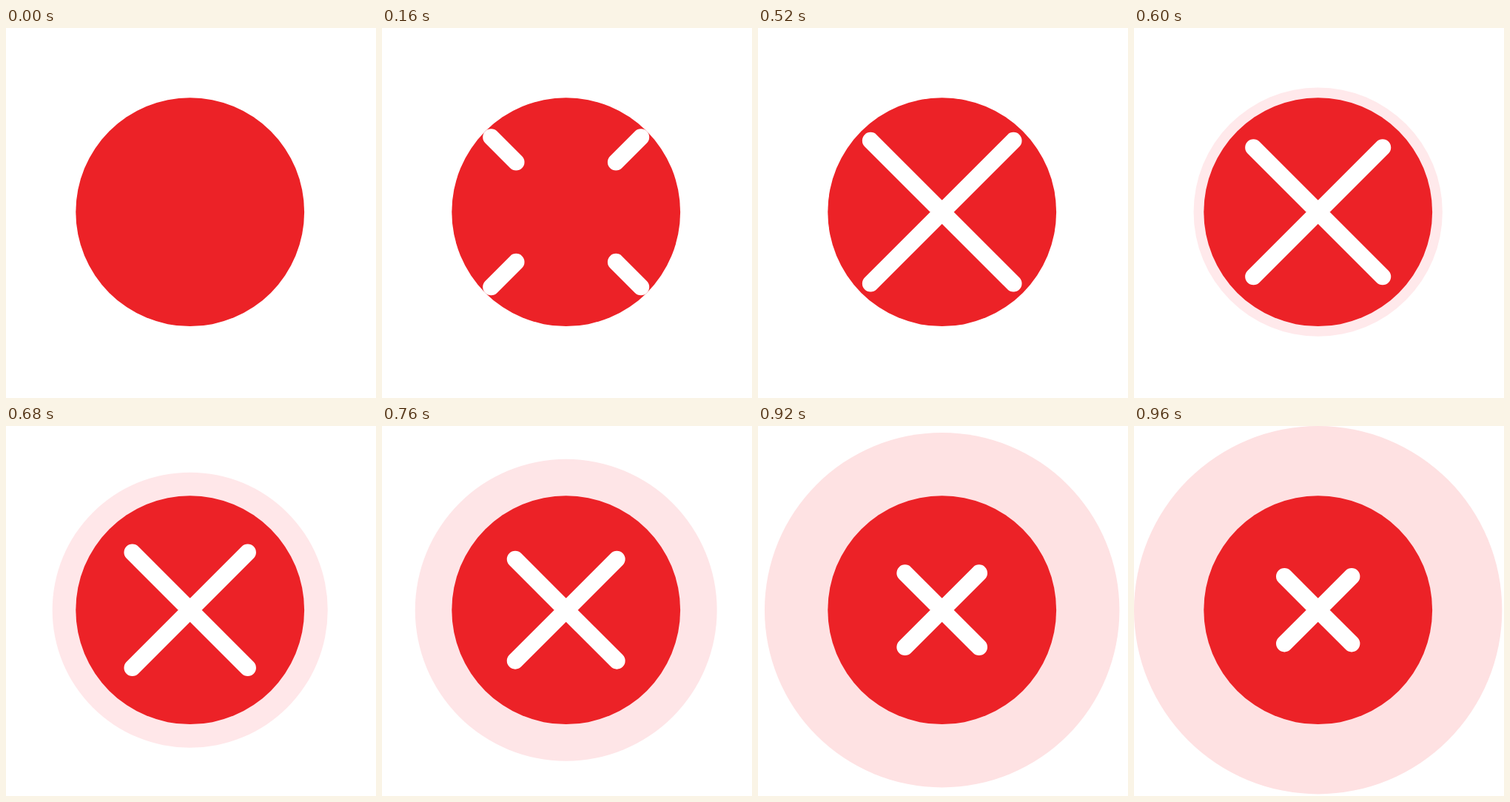
Write an HTML page that moves like this. It is 500 px wide and 500 px high and loops after 1.64 s.

```html
<!DOCTYPE html>
<html lang="en">
<head>
<meta charset="utf-8">
<title>Error cross</title>
<style>
  html, body { margin: 0; width: 100%; height: 100%; overflow: hidden; background: #fff; }
  svg { display: block; width: 100%; height: 100%; }
</style>
</head>
<body>
<svg viewBox="0 0 500 500">
  <g transform="translate(248.7 248.7)">
    <circle id="halo"/>
    <circle r="154.4" fill="#ec2227"/>
    <path id="cross" stroke="#fff" stroke-width="22.6" stroke-linecap="round"/>
  </g>
</svg>
<script>
const LOOP = 1640, STEP = 40, MEET = 480, END = 960;
const REACH = 101.2, FINAL = 45.4;
const halo = document.getElementById('halo');
const cross = document.getElementById('cross');
const corners = [[-1, -1], [1, -1], [1, 1], [-1, 1]];

const mix = (a, b, u) => a + (b - a) * u;
const progress = (t, from, to) => Math.min(1, Math.max(0, (t - from) / (to - from)));

function draw(time) {
  const t = Math.floor(time % LOOP / STEP) * STEP;
  const grow = progress(t, 0, MEET);
  const settle = progress(t, MEET, END);

  // Arms grow inwards until they meet, then shrink from their outer ends.
  const inner = mix(REACH, 0, grow);
  const outer = mix(REACH, FINAL, settle);
  cross.setAttribute('d', t === 0 ? '' : corners.map(([x, y]) =>
    `M${x * outer} ${y * outer}L${x * inner} ${y * inner}`).join(''));

  // The halo starts hidden behind the disc.
  halo.setAttribute('r', mix(141.3, 248.7, settle));
  halo.setAttribute('fill',
    `rgb(${mix(255, 254, settle)}, ${mix(235, 225, settle)}, ${mix(238, 226, settle)})`);
}

const start = performance.now();
function tick() {
  draw(performance.now() - start);
  requestAnimationFrame(tick);
}
tick();
</script>
</body>
</html>
```
